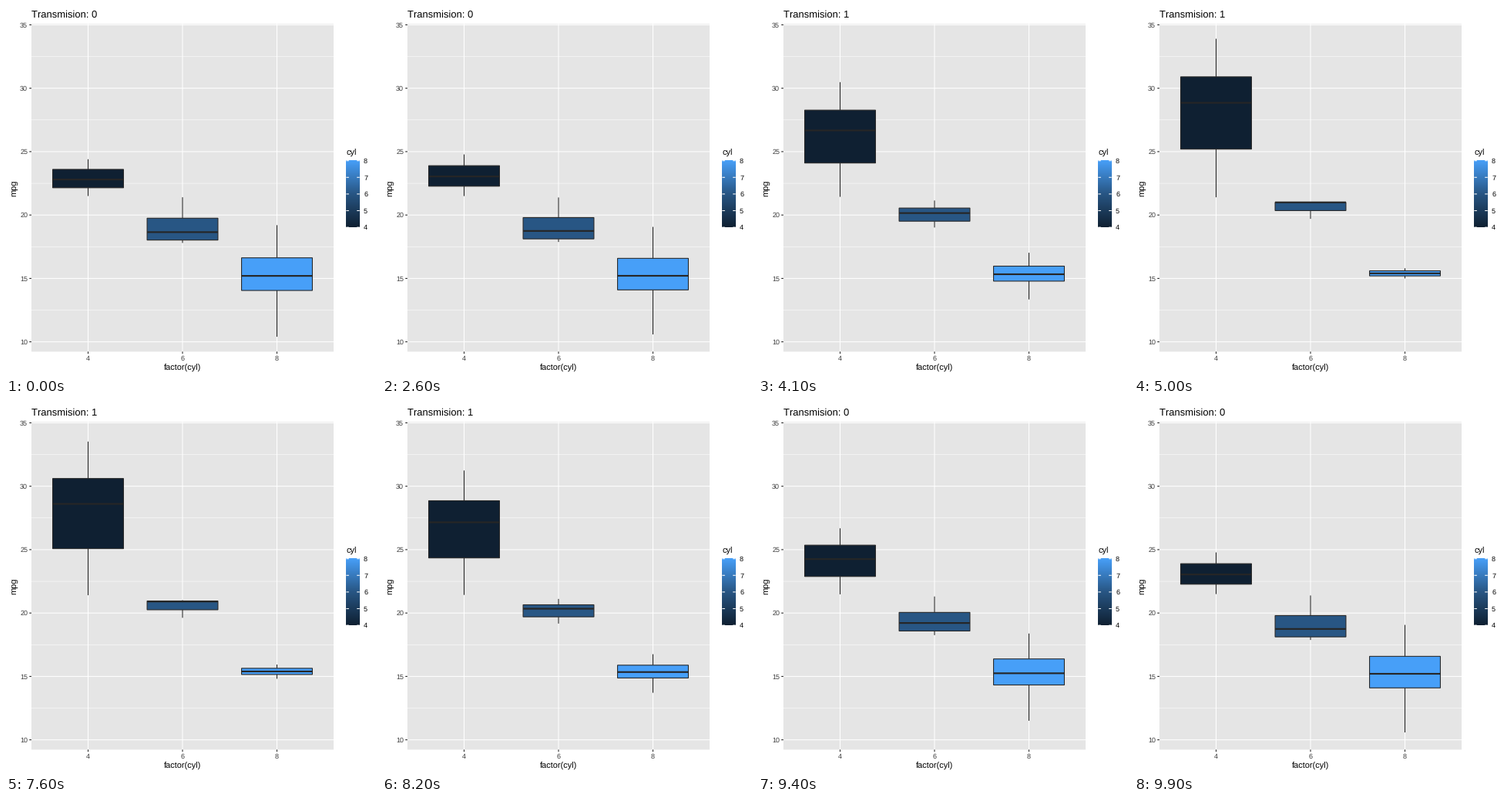
Animation, 480 px wide and 480 px high, one loop 10000 ms. Source, as a matplotlib script:

```python
import numpy as np
import matplotlib.pyplot as plt
from matplotlib.animation import FuncAnimation
from matplotlib.colors import LinearSegmentedColormap
from matplotlib.patches import Rectangle

plt.rcParams["font.family"] = "Liberation Sans"
plt.rcParams["text.hinting"] = "none"
plt.rcParams["text.hinting_factor"] = 1

SIZE, DPI = 480, 72          # at 72 dpi one point is one pixel
FRAMES, INTERVAL = 100, 100
HOLD = MOVE = 25             # frames at rest and in transition

LEFT, RIGHT, TOP, BOTTOM = 33.0, 425.0, 23.2, 448.4
Y_MIN, Y_MAX = 9.225, 35.075
UNIT = (RIGHT - LEFT) / 3.2
LINE = 1.07
DARK, GREY, PANEL = "#262626", "#3c3c3c", "#e5e5e5"
BLUES = LinearSegmentedColormap.from_list(
    "blues", ["#0f2032", "#285684", "#479ff8"])

# low whisker, first quartile, median, third quartile, high whisker
AUTO = np.array([[21.5, 22.15, 22.8, 23.6, 24.4],
                 [17.8, 18.025, 18.65, 19.75, 21.4],
                 [10.4, 14.05, 15.2, 16.625, 19.2]])
MANUAL = np.array([[21.4, 25.2, 28.85, 30.9, 33.9],
                   [19.7, 20.35, 21.0, 21.0, 21.0],
                   [15.0, 15.2, 15.4, 15.6, 15.8]])

fig = plt.figure(figsize=(SIZE / DPI, SIZE / DPI), dpi=DPI, facecolor="white")
ax = fig.add_axes([0, 0, 1, 1])


def x_pos(i):
    return LEFT + (0.6 + i) * UNIT


def y_pos(v):
    return TOP + (Y_MAX - v) * (BOTTOM - TOP) / (Y_MAX - Y_MIN)


def line(xs, ys, color, width, z):
    return ax.plot(xs, ys, color=color, lw=width, zorder=z, snap=False,
                   solid_capstyle="butt")[0]


def label(x, y, s, size, color="black", **kw):
    return ax.text(x, y, s, fontsize=size, color=color, zorder=6, **kw)


def draw_panel():
    ax.add_patch(Rectangle((LEFT, TOP), RIGHT - LEFT, BOTTOM - TOP,
                           fc=PANEL, lw=0, zorder=0, snap=False))
    for v in np.arange(12.5, 35, 5):
        line([LEFT, RIGHT], [y_pos(v)] * 2, "white", LINE / 2, 1)
    for v in range(10, 36, 5):
        y = y_pos(v)
        line([LEFT, RIGHT], [y, y], "white", LINE, 2)
        line([LEFT - 2.75, LEFT], [y, y], DARK, LINE, 2)
        label(LEFT - 4.9, y + 3.2, str(v), 8.8, GREY, ha="right")
    for i, cyl in enumerate((4, 6, 8)):
        x = x_pos(i)
        line([x, x], [TOP, BOTTOM], "white", LINE, 2)
        line([x, x], [BOTTOM, BOTTOM + 2.75], DARK, LINE, 2)
        label(x, 460, str(cyl), 8.8, GREY, ha="center")
    label((LEFT + RIGHT) / 2, 472.6, "factor(cyl)", 11, ha="center")
    label(13.6, (TOP + BOTTOM) / 2, "mpg", 11, rotation=90, ha="right",
          va="center", rotation_mode="default").set_position((16, 236))


def draw_legend():
    x0, x1, y0, y1 = 441.4, 458.7, 200.7, 287.1
    ax.imshow(np.linspace(1, 0, 256)[:, None], cmap=BLUES, vmin=0, vmax=1,
              extent=[x0, x1, y1, y0], aspect="auto", zorder=1)
    label(x0, 193.8, "cyl", 11)
    for k in range(5):
        y = y1 - k * (y1 - y0) / 4
        line([x0, x0 + 3.46], [y, y], "white", LINE, 2)
        line([x1 - 3.46, x1], [y, y], "white", LINE, 2)
        label(464.1, y + 3.2, str(4 + k), 8.8)


class Box:
    def __init__(self, i):
        self.x = x_pos(i)
        self.half = 0.375 * UNIT
        self.low = line([], [], DARK, LINE, 3)
        self.high = line([], [], DARK, LINE, 3)
        self.body = Rectangle((self.x - self.half, 0), 2 * self.half, 1,
                              fc=BLUES(i / 2), ec=DARK, lw=LINE,
                              joinstyle="miter", zorder=4, snap=False)
        ax.add_patch(self.body)
        self.mid = line([], [], DARK, 2 * LINE, 5)

    def set(self, stats):
        lo, q1, med, q3, hi = y_pos(stats)
        self.low.set_data([self.x] * 2, [q1, lo])
        self.high.set_data([self.x] * 2, [q3, hi])
        self.body.set_y(q3)
        self.body.set_height(q1 - q3)
        self.mid.set_data([self.x - self.half, self.x + self.half], [med, med])


draw_panel()
draw_legend()
title = label(LEFT, 15, "", 13.2)
boxes = [Box(i) for i in range(3)]
ax.set_xlim(0, SIZE)
ax.set_ylim(SIZE, 0)
ax.set_aspect("auto")
ax.axis("off")


def update(n):
    half, k = divmod(n, HOLD + MOVE)
    if half and k == 0:
        step = 0
    else:
        step = max(0, k - HOLD)
    p = step / MOVE
    start, end = (MANUAL, AUTO) if half else (AUTO, MANUAL)
    for box, stats in zip(boxes, start + (end - start) * p):
        box.set(stats)
    state = 1 - half if step > MOVE // 2 + 1 else half
    title.set_text(f"Transmision: {state}")
    return [title]


anim = FuncAnimation(fig, update, frames=FRAMES, interval=INTERVAL,
                     repeat=True, repeat_delay=0, blit=False)
plt.show()
```
